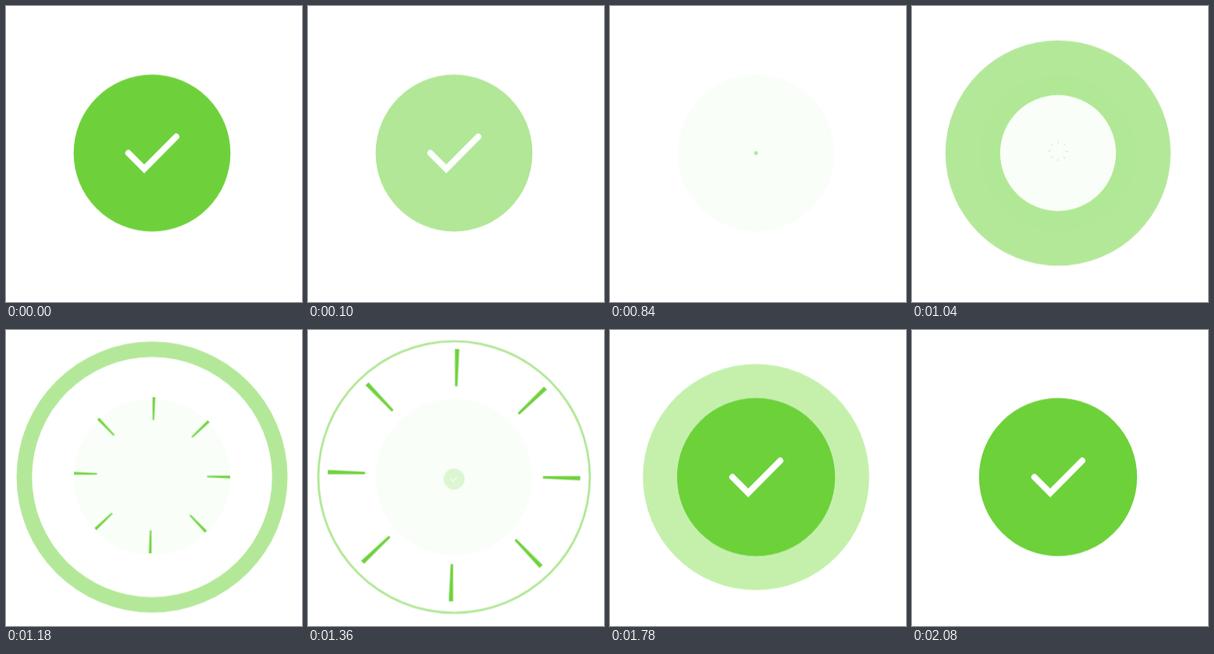
An HTML page without scripts for the animation above (3.6 s loop, 379 by 379 pixels).

```html
<!DOCTYPE html>
<html lang="en">
<head>
<meta charset="utf-8">
<title>Success check</title>
<style>
  html, body { margin: 0; width: 100%; height: 100%; overflow: hidden; background: #fff; }
  svg { display: block; width: 100vw; height: 100vh; }

  .move { animation: 3.6s ease infinite both; }
  .leave { animation-name: leave; animation-timing-function: linear; }
  .ring { animation-name: ring; }
  .hole { animation-name: hole; }
  .ring-fade { animation-name: ring-fade; animation-timing-function: linear; }
  .rays { animation-name: rays; }
  .rays-fade { animation-name: rays-fade; animation-timing-function: linear; }
  .halo { animation-name: halo, halo-fade; animation-timing-function: ease, linear; }
  .pop { animation-name: pop; }
  .pop-fade { animation-name: pop-fade; }

  @keyframes leave {
    0% { opacity: 1; }
    5.78%, 100% { opacity: 0; }
  }
  @keyframes ring {
    0%, 23.06% { r: 0px; }
    34.3%, 100% { r: 175.3px; }
  }
  @keyframes hole {
    0%, 26.03% { r: 0px; }
    37.14%, 100% { r: 172.4px; }
  }
  @keyframes ring-fade {
    0%, 37.9% { opacity: .5; }
    42.2%, 100% { opacity: 0; }
  }
  @keyframes rays {
    0%, 27.56% { transform: scale(0); }
    43.67%, 100% { transform: scale(1); }
  }
  @keyframes rays-fade {
    0%, 38% { opacity: 1; }
    43.67%, 100% { opacity: 0; }
  }
  @keyframes halo {
    0%, 43.89% { r: 0px; }
    55%, 100% { r: 180px; }
  }
  @keyframes halo-fade {
    0%, 47.78% { opacity: .5; }
    57.78%, 100% { opacity: 0; }
  }
  @keyframes pop {
    0%, 36.44% { transform: translateY(3px) scale(0); }
    47.56%, 100% { transform: none; }
  }
  @keyframes pop-fade {
    0%, 36.44% { opacity: 0; }
    45%, 100% { opacity: 1; }
  }
</style>
</head>
<body>
<svg viewBox="0 0 379 379">
  <defs>
    <path id="check" d="M-30.3 0 L-10 20.4 L31 -21" fill="none" stroke="#fff" stroke-width="8" stroke-linecap="round"/>
    <path id="ray" d="M-1.7 -125.5 L-3 -178 H3 L1.7 -125.5 Z"/>
    <g id="cross">
      <use href="#ray"/>
      <use href="#ray" transform="rotate(90)"/>
      <use href="#ray" transform="rotate(180)"/>
      <use href="#ray" transform="rotate(270)"/>
    </g>
    <mask id="cut" maskUnits="userSpaceOnUse" x="-190" y="-190" width="380" height="380">
      <rect x="-190" y="-190" width="380" height="380" fill="#fff"/>
      <circle class="move hole" fill="#000"/>
    </mask>
  </defs>

  <g transform="translate(187 188.3)">
    <circle r="100.4" fill="#f9fff8"/>

    <g class="move leave">
      <circle r="100.4" fill="#6dd13a"/>
      <use href="#check"/>
    </g>

    <g class="move ring-fade">
      <g mask="url(#cut)">
        <circle class="move ring" fill="#69d133"/>
      </g>
    </g>

    <g transform="translate(0 -2.4) rotate(1.4)" fill="#6dd13a">
      <g class="move rays-fade">
        <g class="move rays">
          <use href="#cross"/>
          <use href="#cross" transform="rotate(45)"/>
        </g>
      </g>
    </g>

    <circle class="move halo" fill="#70db36"/>

    <g class="move pop-fade">
      <g class="move pop">
        <circle r="101.2" fill="#6dd13a"/>
        <use href="#check"/>
      </g>
    </g>
  </g>
</svg>
</body>
</html>
```
